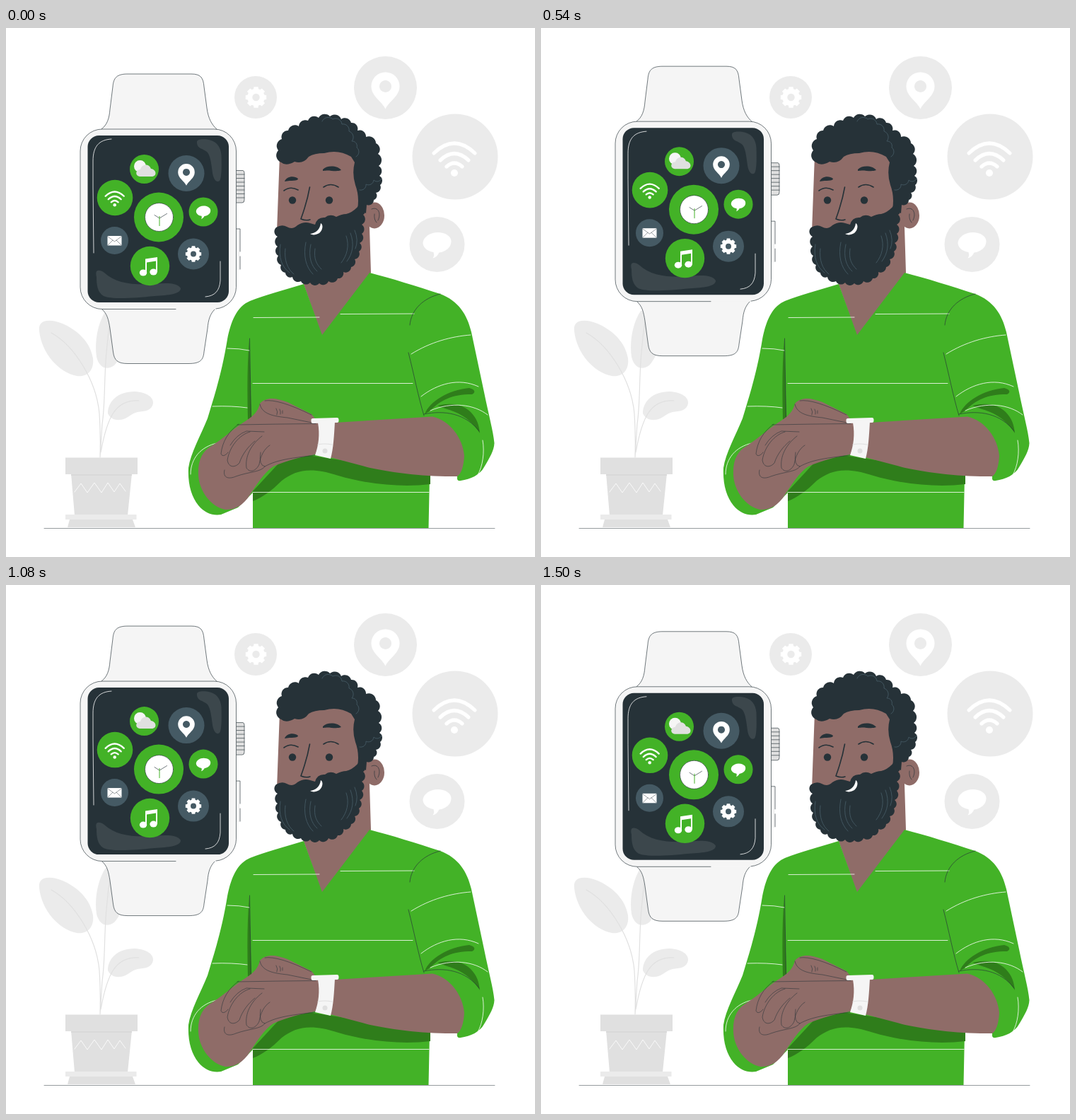
An HTML page for the animation above (1.54 s loop, 748 by 748 pixels).

```html
<!DOCTYPE html>
<html lang="en">
<head>
<meta charset="utf-8">
<title>Smartwatch</title>
<style>
  html, body { margin: 0; width: 100%; height: 100%; overflow: hidden; background: #fff; }
  svg { display: block; width: 100%; height: 100%; }
  .line { fill: none; stroke: #263238; stroke-width: .65; stroke-linecap: round; stroke-linejoin: round; }
  .face { stroke-width: 1.6; }
  .white { fill: none; stroke: #fff; stroke-width: .8; stroke-linecap: round; }
  .grey { fill: none; stroke: #455a64; stroke-width: .9; stroke-linecap: round; }
  .vein { fill: none; stroke: #e0e0e0; stroke-width: 1.2; stroke-linecap: round; }
  .pale { fill: #ebebeb; }
  .mid { fill: #e0e0e0; }
  .light { fill: #f5f5f5; }
  .dark { fill: #263238; }
  .slate { fill: #455a64; }
  .green { fill: #43b227; }
  .shade { fill: #2f7d1b; }
  .skin { fill: #8f6c68; }
  .icon { fill: #fff; }
  .glare { fill: #3c474c; }
</style>
</head>
<body>
<svg viewBox="0 0 748 748" xmlns="http://www.w3.org/2000/svg">
  <defs>
    <path id="gear" fill-rule="evenodd"/>
    <path id="pin" fill-rule="evenodd" d="M0,31 C-5,20 -20,13 -20,-1 A20,20 0 0 1 20,-1 C20,13 5,20 0,31Z M0,-9.5 A8.5,8.5 0 1 0 .01,-9.5Z"/>
    <path id="chat" d="M-6,20 C-4,17 -4,15 -5,11.5 C-15,10 -20,4 -20,-2 C-19,-10 -10,-16.5 1,-16.5 C12,-16.5 20,-11 20,-4 C20,5 12,11 3,12 C1,16 -2,19 -6,20Z"/>
    <g id="wifi">
      <circle cy="23" r="5"/>
      <path fill="none" stroke="#fff" stroke-width="5.2" stroke-linecap="round" d="M-29,-5 Q0,-33 29,-5 M-20,5 Q0,-14 20,5 M-11,14 Q0,4 11,14"/>
    </g>
  </defs>

  <!-- backdrop icons -->
  <g class="pale">
    <circle cx="353" cy="98" r="30"/>
    <circle cx="536.5" cy="84.5" r="44.5"/>
    <circle cx="635" cy="182" r="60.5"/>
    <circle cx="609.5" cy="306" r="39"/>
  </g>
  <g class="icon">
    <use href="#gear" transform="translate(353.500 98) scale(1.250)"/>
    <use href="#pin" transform="translate(536.5 83.5)"/>
    <use href="#wifi" transform="translate(634 182)"/>
    <use href="#chat" transform="translate(609.5 305.5)"/>
  </g>

  <!-- plant -->
  <g class="pale">
    <path d="M47,428 C45,412 62,411 80,418 C104,429 119,445 123,467 C125,484 115,494 100,492 C75,487 50,460 47,428Z"/>
    <path d="M141,400 C129,418 125,445 128,465 C132,482 144,484 153,477 C167,462 175,430 172,400Z"/>
    <path d="M144,545 C144,528 158,514 182,514 C200,515 209,523 208,531 C206,541 196,542 186,543 C175,546 172,553 162,554 C152,555 147,551 144,545Z"/>
  </g>
  <path class="vein" d="M64,431 C98,450 128,500 132,545 Q134,575 133,607 M149,402 C136,480 142,520 136,560 L133,607 M188,527 C155,525 143,550 134,600"/>
  <path class="mid" d="M92,630 H178 L172,689 H97Z M84,607.500 H186 V631 H84Z M90,695 H179 L183,706 H87Z"/>
  <path fill="#d9d9d9" d="M92,631 H178 L177.800,633 H92.200Z"/>
  <path class="pale" d="M84,688 H184.500 V695 H84Z"/>
  <path class="white" d="M97,656 L106,644 L115,657 L125,643 L135,657 L144,643 L153,656 L161,644 L169,655"/>
  <path class="line" stroke-opacity=".75" d="M54,707.500 H691"/>

  <!-- man -->
  <path class="skin" d="M387,180 L383,288 L400,340 L420,360 L447,436 L516,346 L513,250 L500,170Z"/>
  <ellipse class="skin" cx="521" cy="265" rx="14" ry="18.500"/>
  <path class="line" d="M517,256 C526,252 531,262 526,272 M521,263 Q520,271 524,275"/>

  <path class="green" d="M421,362 C395,370 365,378 345,386 C326,394 318,415 313,440 C305,490 293,525 285,552 C275,577 261,601 258,622 C257,645 262,662 272,675 C281,686 293,690 304,688 L328,678 L349,657 V707 H597.500 L599,633 L638,632 V638 Q639,641 643,640 C657,638 670,632 676,621 C685,606 690,597 690.500,587 C689,570 682,545 676,515 L658,430 C652,405 640,386 614,376 C580,365 545,354 514,346 L447,434Z"/>
  <path class="shade" d="M349,655 L400,600 L600,630 V645 C560,650 510,645 470,633 C430,620 410,625 390,640 C375,655 362,664 349,669Z"/>
  <path class="shade" d="M344,440 C345,480 346,520 347,556 L342,553 C341,515 341,475 344,440Z"/>
  <path class="shade" d="M592,546 C599,528 625,512 655,509 C664,511 664,516 659,518 C630,518 615,526 600,541Z M610,534 C630,529 647,533 657,543 C666,552 669,562 670,573 C662,560 650,549 635,543 C625,539 617,537 610,534Z"/>
  <path class="white" d="M350,409.500 L443,409 M473,404.500 L577,404 M313,453 Q330,453 344,456 M349,502.500 H575 M292,535 Q320,534 341,537 M573,461 C600,444 630,436 657,434 M587,521 C610,503 640,494 668,507 M600,541 C630,528 662,532 681,547 M349,656.500 H598 M298,587 C276,592 261,608 261,631 M674,583 C677,600 674,620 667,632"/>
  <path class="line" d="M614,376 C590,382 573,398 571,420 M569,459 C577,490 583,522 591,548 M591,546 C620,540 650,545 669,570 M344.500,439 L346.500,554"/>

  <path class="skin" d="M359,531 C368,521 382,523 398,529 L432,546 L440,556 L465,558 L603,549.500 C628,555 646,580 648,605 C647,620 644,630 638,634 C590,635 530,627 500,618 L462,608 L437,603 C420,606 398,611 378,620 C365,628 353,648 345,660 C335,676 322,682 310,681 C290,677 273,655 272,632 C271,610 278,598 292,590 C310,578 318,570 328,563 C342,553 355,548 359,531Z"/>
  <path class="line" stroke-opacity=".85" d="M327,561 Q380,560 438,559.500 M329,560 C314,571 306,585 304,602 C306,607 311,604 314,600 M345,571 C330,575 316,592 313,611 C315,623 325,621 330,615 C334,603 342,592 352,584 M362,577 C345,590 338,607 340,622 C345,630 354,626 358,617 C360,605 365,595 373,590 M309,625 C306,637 316,638 325,634 C345,627 360,628 366,620 C384,610 405,608 437,604 M360,600 Q357,619 366,620 M317,590 Q326,575 340,570 L365,571 M359,532 C362,546 378,549 398,551 L432,558 M366,527 Q385,524 432,547 M382,538 Q385,543 383,547 M387,539 Q389,543 388,546 M391,541 V545"/>
  <path class="light" d="M441,558 L465,557 C464,575 463,595 459,609 L437,604 C442,590 444,575 441,558Z"/>
  <rect class="light" x="431.500" y="551.500" width="39" height="7" rx="2.500" transform="rotate(-2 451 555)"/>
  <path class="vein" d="M441,589 Q450,587 461,589"/>
  <circle class="mid" cx="451" cy="598" r="3.500"/>

  <path class="dark" data-bumps="389,190 385,173 390,157 399,145 414,139 427,131 442,127 458,125 474,129 488,134 497,145 509,154 523,163 526,178 527,195 528,209 529,222 523,233 520,243 510,250" data-tail="L509,262 L497,256 Q500,238 494,222 Q489,206 493,190 L488,182 Q470,171 450,177 Q436,177 428,182 Q420,193 408,189 Q396,196 389,190Z"/>
  <path class="dark" data-bumps="498,252 505,252 505,264 503,278 503,291 500,304 499,316 493,327 488,338 477,345 469,354 456,358 443,361 430,360 417,358 405,352 395,346 389,335 385,322 384,309 384,295 382,282" data-tail="Q390,277 397,281 Q405,286 412,279 Q421,273 430,276 L437,278 Q440,267 451,268 Q458,262 467,267 Q475,263 481,263 Q490,261 498,252Z"/>
  <path class="grey" data-bumps="447,132 462,129 475,136 485,146 489,160 496,169 495,182"/>
  <path class="grey" data-bumps="531,213 520,215 509,221 500,229"/>
  <path class="grey" d="M388,306 C385,325 390,338 401,346 M395,312 C393,328 398,341 407,348 M424,303 C420,322 424,338 434,348 M431,306 C427,324 432,337 440,344 M437,312 C435,327 439,334 446,341 M481,294 C486,308 482,322 474,332 M487,290 C493,306 490,319 482,330 M493,286 Q499,300 494,312"/>
  <circle class="dark" cx="405" cy="243.500" r="5.200"/>
  <circle class="dark" cx="457" cy="243.500" r="5.200"/>
  <path class="dark" d="M394,217 C396,210 407,208 413,213 C413,217 403,215 394,217Z M448,200 C454,194 468,194 474,201 C466,204 457,200 448,202Z"/>
  <path class="line face" d="M393,230 Q402,223 413,229 M449,225 Q459,218 470,225 M429.500,225 C426,245 421,259 417,270 Q424,273 430,271"/>
  <path class="icon" d="M430,291 C438,290 444,285 445,276 C449,278 448,286 443,290 C438,293 433,293 430,291Z"/>

  <!-- floating watch -->
  <g id="watch">
    <g class="light">
      <path d="M134,144 C143,137 146,128 147,115 L151,83 C152,70 157,65 172,65 H262 C275,65 279,70 280,83 L284,113 C286,128 291,137 298,144Z"/>
      <path d="M134,396 C143,404 145,412 147,425 L151.500,458 C153,470 158,474.500 172,474.500 H258 C274,474.500 279,470 280,458 L285,425 C286,412 289,403 297,396Z"/>
    </g>
    <path class="line" d="M135,143 C143,137 146,128 147,115 L151,83 C152,70 157,65 172,65 H262 C275,65 279,70 280,83 L284,113 C286,128 291,137 298,143 M136,398 C143,404 145,412 147,425 L151.500,458 C153,470 158,474.500 172,474.500 H258 C274,474.500 279,470 280,458 L285,425 C286,412 289,404 295,398"/>
    <rect class="mid" x="325" y="201.500" width="12" height="45.500" rx="2"/>
    <path class="line" d="M325,201.500 H335 Q337,202 337,205 V243 Q337,247 334,247 H325 M326,207 H337 M326,212.500 H337 M326,218 H337 M326,223.500 H337 M326,229 H337 M326,234.500 H337 M326,240 H337"/>
    <path class="light" d="M325,284 H331 V342 H325Z"/>
    <path class="line" d="M325,284 H331 V316 M331,323 V341"/>
    <rect class="light" x="105" y="143" width="220.500" height="254.500" rx="31"/>
    <path class="line" d="M240,397.500 H136 A31,31 0 0 1 105,366.500 V174 A31,31 0 0 1 136,143 H294.500 A31,31 0 0 1 325.500,174 V366.500 A31,31 0 0 1 297,397"/>
    <rect class="dark" x="115.500" y="152" width="199.500" height="236" rx="16"/>
    <path class="glare" d="M270,163 C269,157 276,157 284,157.500 C297,159 304,168 304.500,180 C305,195 305,212 302,216 C297,220 293,212 292,205 C290,190 289,180 284,175 C278,170 271,171 270,163Z M128,352 C125,341 132,341 139,346 C155,361 180,364 210,362 C225,360 243,360 247,368 C247,376 230,378 210,379 C180,382 150,384 138,379 C129,374 128,362 128,352Z"/>
    <path class="white" d="M149,157 C131,158 123,168 123,188 V225 L124,318 M303,330 V357 C302,372 295,379 282,380"/>

    <g class="green">
      <circle cx="195.500" cy="199.500" r="20.500"/>
      <circle cx="154" cy="240" r="25.300"/>
      <circle cx="216" cy="267.500" r="35"/>
      <circle cx="279" cy="260" r="20.500"/>
      <circle cx="203.500" cy="336.500" r="27.700"/>
    </g>
    <g class="slate">
      <circle cx="255" cy="205.500" r="25.500"/>
      <circle cx="153.500" cy="300.500" r="19.500"/>
      <circle cx="265" cy="319.500" r="22"/>
    </g>
    <circle class="light" cx="189.500" cy="195.500" r="8.500"/>
    <path class="mid" d="M189,210 C182,209 183,200 190,200 C192,192 202,191 205,199 C213,200 214,210 206,210Z"/>
    <circle class="icon" cx="216.500" cy="267.500" r="20"/>
    <circle class="line" cx="216.500" cy="267.500" r="20"/>
    <path class="line" d="M210,264.500 L217,269 L227.500,262.500"/>
    <path d="M217,266 V280" fill="none" stroke="#43b227"/>
    <g class="icon">
      <use href="#pin" transform="translate(255 204.500) scale(.590)"/>
      <use href="#wifi" transform="translate(153.700 240) scale(.450)"/>
      <use href="#chat" transform="translate(279 260) scale(.510)"/>
      <use href="#gear" transform="translate(265 319.500) scale(.950)"/>
      <rect x="143.500" y="294" width="20" height="13.500"/>
      <ellipse cx="194" cy="346" rx="5.200" ry="4.500"/>
      <ellipse cx="208.500" cy="345" rx="5.200" ry="4.500"/>
      <path d="M197,326.500 L214,324 V345 H212 V329.500 L199,331.500 V346 H197Z"/>
    </g>
    <path class="line" stroke-opacity=".7" d="M143.500,294.500 L153.500,302 L163.500,294.500 M144,307 L151,300 M163,307 L156,300"/>
  </g>
</svg>
<script>
  // Scalloped outline: one outward arc between each pair of points.
  function bumps(list) {
    const pts = list.split(' ').map(p => p.split(',').map(Number));
    return pts.map(([x, y], i) => {
      if (!i) return `M${x},${y}`;
      const r = Math.hypot(x - pts[i - 1][0], y - pts[i - 1][1]) * 0.6;
      return `A${r},${r} 0 0 1 ${x},${y}`;
    }).join(' ');
  }

  function gearPath(teeth, outer, inner, hole) {
    const step = Math.PI * 2 / teeth;
    const at = (a, r) => `${r * Math.cos(a)},${r * Math.sin(a)}`;
    let d = '';
    for (let i = 0; i < teeth; i++) {
      const a = i * step;
      d += `${i ? 'L' : 'M'}${at(a - step * .36, inner)} L${at(a - step * .26, outer)} L${at(a + step * .26, outer)} L${at(a + step * .36, inner)} `;
    }
    return `${d}Z M${hole},0 A${hole},${hole} 0 1 0 ${-hole},0 A${hole},${hole} 0 1 0 ${hole},0Z`;
  }

  for (const el of document.querySelectorAll('[data-bumps]'))
    el.setAttribute('d', bumps(el.dataset.bumps) + (el.dataset.tail || ''));

  document.getElementById('gear').setAttribute('d', gearPath(8, 12, 9.8, 4.2));

  const LOOP = 1540, FPS = 24, RISE = 15.4, LEAD = 55;
  const watch = document.getElementById('watch');

  // Linear bob up and down, held on 24 fps steps with 10 ms timing.
  function draw() {
    const t = Math.floor(performance.now() % LOOP / 10) * 10;
    const held = Math.floor((t + 4.9) * FPS / 1000) * 1000 / FPS;
    const phase = (held + LEAD) / (LOOP / 2) % 2;
    const y = 1.1 - RISE * (1 - Math.abs(1 - phase));
    watch.setAttribute('transform', `translate(0 ${y.toFixed(2)})`);
    requestAnimationFrame(draw);
  }
  draw();
</script>
</body>
</html>
```
